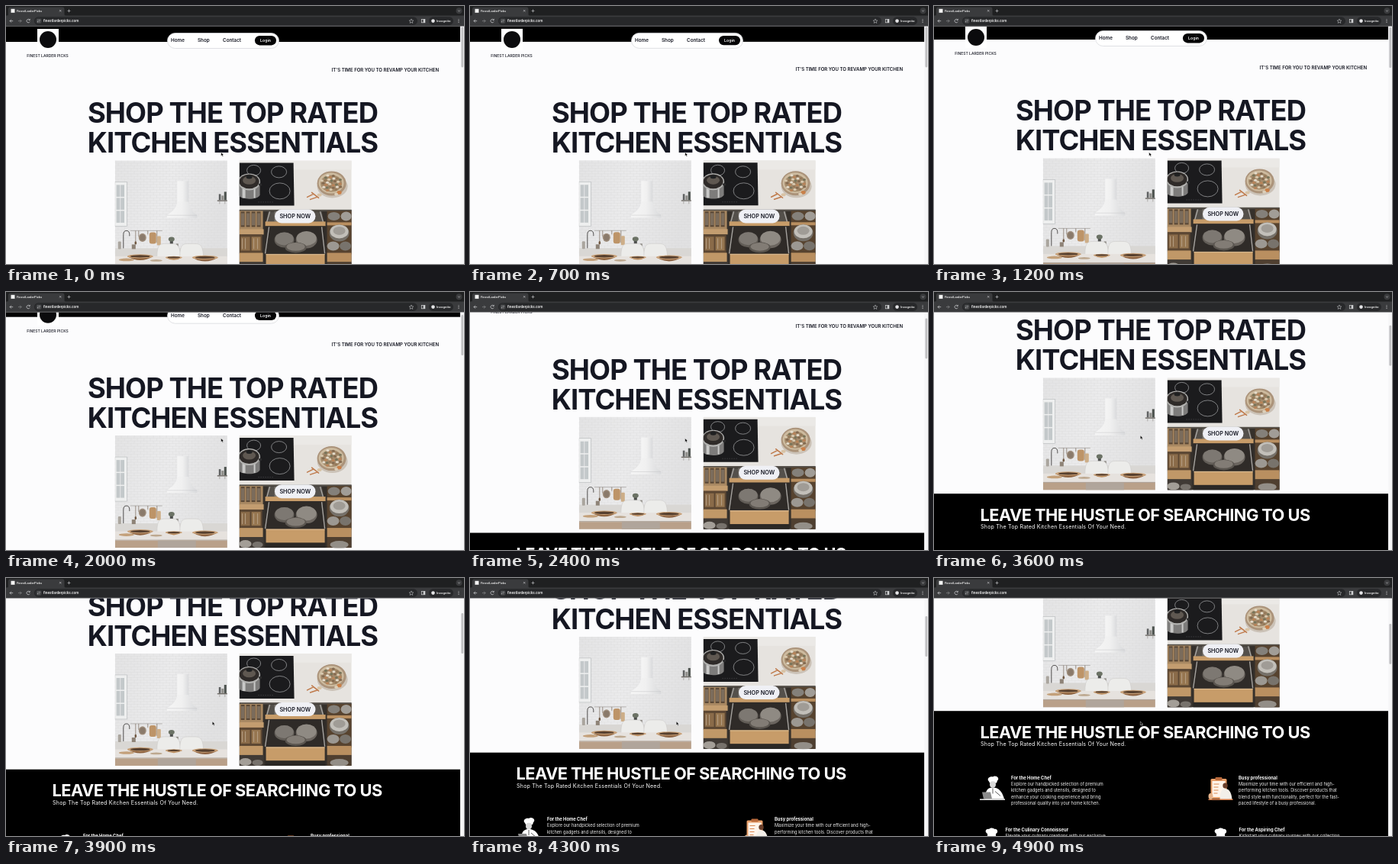
Recreate the animation shown at these times as an HTML page. Size 600x338 px, loop 5 s.

```html
<!DOCTYPE html>
<html lang="en">
<head>
<meta charset="utf-8">
<title>FinestLarderPicks</title>
<style>
  html, body { margin: 0; width: 100%; height: 100%; overflow: hidden; background: #fcfcfd; }
  svg { display: block; width: 600px; height: 338px; font-family: Inter, "Liberation Sans", sans-serif; }
  .ui { font-family: Roboto, "Liberation Sans", sans-serif; }
</style>
</head>
<body>
<svg id="stage" viewBox="0 0 600 338" xmlns="http://www.w3.org/2000/svg"></svg>
<script>
const LOOP = 5000, STEP = 100, VIEW_TOP = 26.5, PAGE_W = 595.3;
const INK = '#151722';

// time in ms, value
const SCROLL = [[0, 0], [600, 0], [1200, 3], [2000, 14.3], [2900, 67], [3000, 67.2], [3600, 90], [4300, 125.5], [4900, 180]];
const POINTER = [[3000, 281.7, 191.7], [3500, 270.3, 188]];

const rect = (x, y, w, h, fill, more = '') =>
  `<rect x="${x}" y="${y}" width="${w}" height="${h}" fill="${fill}" ${more}/>`;
const oval = (x, y, rx, ry, fill, more = '') =>
  `<ellipse cx="${x}" cy="${y}" rx="${rx}" ry="${ry}" fill="${fill}" ${more}/>`;
const path = (d, fill, more = '') => `<path d="${d}" fill="${fill}" ${more}/>`;
const line = (d, color, w = 0.6, more = '') =>
  path(d, 'none', `stroke="${color}" stroke-width="${w}" ${more}`);
// y is the middle of the capitals
const text = (x, y, str, size, weight, fill, more = '') =>
  `<text x="${x}" y="${(y + size * 0.364).toFixed(2)}" font-size="${size}" font-weight="${weight}" fill="${fill}" ${more}>${str}</text>`;
const group = (x, y, inner, more = '') => `<g transform="translate(${x} ${y})" ${more}>${inner}</g>`;

function bricks(w, h) {
  const bw = 8.4, bh = 3.5;
  let d = '';
  for (let r = 0; r * bh < h; r++) {
    const y = r * bh;
    d += `M0 ${y}H${w}`;
    for (let x = (r % 2) * bw / 2; x < w; x += bw) d += `M${x.toFixed(1)} ${y}v${bh}`;
  }
  return line(d, '#d5d5d5', 0.35);
}

function bowl(x, y, rx, color) {
  return path(`M${x - rx} ${y}Q${x} ${y + rx * 0.6} ${x + rx} ${y}Z`, color) +
    oval(x, y, rx, rx * 0.16, '#c9a27a') + oval(x, y, rx * 0.75, rx * 0.1, '#57402f');
}

function wallPhoto() {
  let s = rect(0, 0, 147, 147, 'url(#wall)') + bricks(147, 120);
  // cabinet
  s += rect(0, 28, 15.5, 58, '#eeefef', 'stroke="#b5b8ba" stroke-width=".6"');
  for (let i = 0; i < 6; i++) s += rect(1.8 + (i % 2) * 5.6, 32 + (i >> 1) * 17, 4.8, 15.5, '#c3c8ca');
  // hood
  s += rect(81.5, 27, 15, 28, 'url(#hood)') +
    path('M81.5 54C80.500 63 74 68 68 71.500V75H107.500V71.500C102 68 97.500 63 96.500 54Z', 'url(#hood)') +
    line('M68 71.800H107.500', '#c4c5c7', 0.5);
  // shelf
  s += rect(134, 52, 13, 1.4, '#6f6b66') + rect(136, 44, 2.6, 8, '#5f6162') + rect(139.5, 46, 3, 6, '#8e8d89') +
    rect(143, 41, 3, 11, '#4c524e') + line('M137 53.500V57M144 53.500V57', '#8b8681');
  // tap, hanging tools and boards
  s += line('M11 116V97Q11 92 15 92T19 97V99', '#3f3d3b', 0.9) + line('M20 92H62', '#8d8a86', 0.6) +
    line('M27 92V107M31 92V100M43 92V97M55 92V108', '#77685a', 0.7) +
    oval(36, 101, 5, 5.6, '#a1907f') + oval(36, 101, 3.6, 4.2, '#8a7a6b') + oval(27, 108, 1.3, 2.2, '#6f5741') +
    rect(45, 94, 9, 15, '#bd9468', 'rx="3"') + rect(55, 99, 5, 12, '#cdae88', 'rx="1"');
  // back counter, jars, chairs
  s += rect(0, 115, 147, 11, '#d9d7d4') + rect(4, 106, 4, 10, '#aaa59e', 'rx="1"') + rect(22, 110, 5, 6, '#8e8377') +
    rect(72, 104, 4, 12, '#4b4d4b', 'rx="1"') + oval(74, 103, 4, 3, '#6b7265') + rect(80, 109, 3, 7, '#8f8c86');
  for (const x of [55, 85])
    s += path(`M${x} 128C${x} 108 ${x + 4} 109 ${x + 15} 109S${x + 30} 108 ${x + 31} 128Z`, '#ececea',
      'stroke="#c6c5c3" stroke-width=".5"');
  // table
  s += rect(0, 125.5, 147, 11, '#e6e2de') + rect(0, 136.5, 147, 1, '#a99d91') + rect(0, 137.5, 147, 9.5, '#b9a089') +
    rect(56, 137.5, 50, 9.5, '#b0a59b');
  s += bowl(33, 125.5, 17, '#8f6440') + bowl(77, 127, 11, '#b98a5b') + bowl(118, 127, 17, '#8d6342') +
    oval(15, 130, 10, 1.8, '#c3a07a') + oval(54, 131, 8, 1.4, '#bda88f');
  return s;
}

function stovePhoto() {
  const ring = (x, y, rx, ry) => oval(x, y, rx, ry, 'none', 'stroke="#c2c3c5" stroke-width=".6"');
  let s = rect(0, 0, 147, 65, '#e6e3df') + rect(0, 0, 147, 12, '#ebe9e6');
  s += path('M0 3H71L72 59H0Z', '#1b1b1d') + ring(19, 13, 9, 7) + ring(52, 15, 10, 7.5) + ring(53, 40, 13.5, 10.5) +
    line('M25 54.500H46', '#6d6e71', 0.6, 'stroke-dasharray="1 2"');
  // pot
  s += path('M-1 29V45C1 52 25 52 27 45V29Z', '#7d7c7b') + path('M4 32V49H8V32ZM19 32V49H21V32Z', '#c9c9c8') +
    oval(13, 28, 14.5, 11, '#b3b3b1') + oval(13, 27.5, 13, 9.4, '#2f2b29') + oval(13, 26, 8.5, 5.4, '#5f5851') +
    oval(13, 21.5, 4, 2.5, '#1f2021') + rect(25.5, 30, 4, 3, '#2a2a2b', 'rx="1"');
  // basket
  s += oval(122, 34, 20, 15, '#cbc2b7') + oval(121, 30, 19, 16, '#ab937a') + oval(120.5, 29.5, 16.5, 13.5, '#cdbb9f') +
    oval(120.5, 30, 14, 11, '#a48b6c');
  const food = ['#94795a', '#d9cab0', '#77745a', '#b98358', '#e4dccd', '#846a50'];
  for (let i = 0; i < 30; i++) {
    const a = i * 2.4, r = Math.sqrt(i / 30);
    s += oval((120.5 + 14 * r * Math.cos(a)).toFixed(1), (29.5 + 11 * r * Math.sin(a)).toFixed(1), 2, 1.5, food[i % 6]);
  }
  s += line('M89 48L97 44M93 51L102 48M95 42L104 49', '#bf7a4b', 1.5, 'stroke-linecap="round"') +
    oval(105, 45, 3, 2, '#d8c3a6') + oval(131, 42, 3, 2.4, '#c97f48') + oval(127, 44, 2.4, 1.9, '#dccfb9');

  // drawers
  s += rect(0, 64.5, 147, 82.5, '#35302b') + rect(0, 64.5, 147, 2, '#55504a');
  s += rect(0, 66, 31, 25, '#a88862');
  for (let x = 2; x < 30; x += 7) s += rect(x, 67, 5, 20, '#584635') + line(`M${x + 1.5} 69V85M${x + 3.5} 69V85`, '#b3a898', 0.8);
  s += rect(0, 90, 32, 7, '#c39d70') + rect(0, 97, 30, 25, '#5c4733') + rect(2, 100, 12, 18, '#8a6b49') +
    rect(16, 100, 12, 18, '#967650') + line('M4 102V116M8 102V116M19 102V116M24 102V116', '#bba78d', 0.9) +
    rect(0, 121, 31, 12, '#c09868') + rect(0, 133, 32, 14, '#403a35') + oval(8, 142, 8, 5, '#a39e97') + oval(24, 143, 7, 4, '#77726c');
  s += path('M38 67H108L111 81H35Z', '#54504b') + rect(46, 67, 18, 13, '#7d7872') + rect(68, 68, 28, 11, '#403c38') +
    line('M40 67L36 81M106 67L110 81', '#aaa7a3', 1.4) + rect(34, 80, 79, 6, '#c79c69') + rect(34, 86, 79, 37, '#2f2b28') +
    path('M39 87L34 122M108 87L112 122', 'none', 'stroke="#a5a29e" stroke-width="1.4"') +
    oval(59, 104, 13, 10, '#625d57') + oval(59, 102.5, 12, 8.5, '#7d7872') + oval(88, 104, 14, 11, '#6b655f') +
    oval(88, 102, 13, 9.5, '#8f8a83') + oval(74, 114, 14, 7, '#5a554f') + oval(74, 113, 12, 5.4, '#827c75') +
    rect(35, 122.5, 77, 18, '#c79c69') + rect(35, 122.5, 77, 1.2, '#dab98e') + rect(34, 140.5, 79, 6.5, '#2b2825');
  s += rect(115, 66, 32, 57, '#57432f') + oval(124, 73, 8, 5.5, '#84807a') + oval(140, 73, 7, 6, '#a19d97') +
    rect(115, 81, 32, 4, '#b98f60') + oval(131, 95, 13, 11, '#757069') + oval(131, 93, 12, 9, '#c2bfb9') +
    oval(131, 92, 8, 5.5, '#a09c96') + oval(123, 112, 8, 6, '#9c9892') + oval(139, 112, 7.5, 6, '#78736c') +
    rect(115, 121, 32, 12, '#b98f60') + rect(115, 133, 32, 14, '#4f3f30') + oval(131, 143, 12, 5, '#938e87');
  return s;
}

const chefIcon =
  path('M12 6C8 2 14 -1 17 0C21 -3 27 2 23 5L22 8H13Z', '#fff') + oval(17, 10, 4, 4.2, '#d9d9d9') +
  path('M7 29C7 18 10 14 17 14S29 18 32 29Z', '#fff') + path('M3 20H14L16 29H5Z', '#8b8b8b') +
  rect(0, 29, 33, 1.4, '#fff') + line('M17 15V22M20 19L27 25', '#333', 0.8);

const clipIcon =
  rect(3, 2, 21, 26, '#e9a06a', 'rx="1.5"') + rect(5, 5, 17, 21, '#fff4ea') + rect(9, 0, 9, 4, '#b96a3c', 'rx="1"') +
  line('M7 9H14M7 13H13M7 17H13M7 21H12', '#d98a55', 1) + oval(22, 11, 3.2, 3.6, '#6a3f2a') +
  path('M15 29C15 18 18 15 22 15S30 18 31 29Z', '#f3efe9') + rect(0, 28.5, 32, 1.5, '#d97f4b') + oval(3, 25, 3, 4, '#e6b48b');

const hatIcon = path('M3 10V6C-2 3 2 -1 5 0C8 -3 12 -1 12 0C16 -1 18 4 14 6V10Z', '#fff') +
  rect(4, 11, 9, 9, '#d9d9d9');

function feature(x, y, title, rows) {
  return text(x, y, title, 5.8, 700, '#fff') +
    rows.map((r, i) => text(x, y + 8.3 + i * 8.5, r, 5.65, 400, '#f1f1f1')).join('');
}

function page() {
  const middle = 'text-anchor="middle"', tight = 'letter-spacing="-.025em"';
  let s = rect(0, 0, PAGE_W, 620, '#fcfcfd') + rect(0, 20, PAGE_W, 27, '#000');
  s += rect(41, 30, 28, 28, '#fff') + oval(55, 44, 11, 11, '#0b0b0d') +
    text(54.5, 65, 'FINEST LARDER PICKS', 5, 500, INK, middle);
  s += rect(211.5, 35.5, 146, 20, '#fff', 'rx="10" stroke="#d9dade" stroke-width=".8"') +
    text(216, 45, 'Home', 6.3, 600, INK) + text(251, 45, 'Shop', 6.3, 600, INK) + text(284, 45, 'Contact', 6.3, 600, INK) +
    rect(326, 39, 28, 12.4, '#050506', 'rx="6.2"') + text(340, 45, 'Login', 5.2, 600, '#fff', middle);
  s += text(567, 83.3, "IT'S TIME FOR YOU TO REVAMP YOUR KITCHEN", 6.05, 600, INK, 'text-anchor="end"');
  s += text(297, 140.2, 'SHOP THE TOP RATED', 36.3, 700, INK, middle + tight.padStart(30)) +
    text(297, 179.2, 'KITCHEN ESSENTIALS', 36.3, 700, INK, middle + tight.padStart(30));
  s += group(142.8, 202.4, wallPhoto(), 'clip-path="url(#photo)"') + group(305.6, 202.4, stovePhoto(), 'clip-path="url(#photo)"');
  s += rect(352, 266.5, 53.5, 18, '#eff0f5', 'rx="9"') +
    text(378.8, 275.5, 'SHOP NOW', 7.3, 600, INK, middle);
  s += rect(0, 354.2, PAGE_W, 260, '#000') +
    text(60.5, 381.7, 'LEAVE THE HUSTLE OF SEARCHING TO US', 21.8, 700, '#fff', tight) +
    text(61, 397.8, 'Shop The Top Rated Kitchen Essentials Of Your Need.', 7.14, 400, '#fff', 'letter-spacing=".18"');
  s += group(60, 440.5, chefIcon) + group(359.5, 441, clipIcon) + group(67, 509, hatIcon) + group(367, 509, hatIcon);
  s += feature(101, 441.6, 'For the Home Chef', ['Explore our handpicked selection of premium',
    'kitchen gadgets and utensils, designed to', 'enhance your cooking experience and bring', 'professional quality into your home kitchen.']);
  s += feature(399, 441.6, 'Busy professional', ['Maximize your time with our efficient and high-',
    'performing kitchen tools. Discover products that', 'blend style with functionality, perfect for the fast-', 'paced lifestyle of a busy professional.']);
  s += feature(93.5, 509.6, 'For the Culinary Connoisseur', ['Elevate your culinary creations with our exclusive']);
  s += feature(399.5, 509.6, 'For the Aspiring Chef', ['Kickstart your culinary journey with our collection']);
  return s;
}

function browser() {
  const c = '#d5d6d8', dim = '#8b8c8f';
  let s = rect(0, 0, 600, 13, '#1f2021') + rect(0, 12.5, 600, VIEW_TOP - 12.5, '#3a3b3d') +
    path('M1 13Q3 13 3 11V4Q3 1.500 5.500 1.500H74Q76.500 1.500 76.500 4V11Q76.500 13 78.500 13Z', '#3a3b3d');
  s += rect(6.5, 3.8, 5, 5, '#f4f4f4') + text(14, 6.3, 'FinestLarderPicks', 4.1, 500, '#f0f0f0') +
    line('M70 5.100L72.400 7.500M72.400 5.100L70 7.500', c, 0.6) + line('M82.500 4.400V8.400M80.500 6.400H84.500', c, 0.6) +
    oval(593.5, 6.2, 4, 4, '#3a3b3d') + line('M592 5.600L593.500 7L595 5.600', c, 0.6);
  s += line('M9.200 19.600H5M7 17.600L5 19.600L7 21.600', c, 0.7) + line('M16 19.600H20.200M18.200 17.600L20.200 19.600L18.200 21.600', dim, 0.7) +
    line('M31 18.300A2.200 2.200 0 1 0 31.200 20.500M31.300 16.800V18.500H29.600', c, 0.7);
  s += rect(37, 14.3, 502, 10.6, '#27282a', 'rx="5.3"') + oval(43, 19.6, 4, 4, '#3a3b3d') +
    line('M41 18.500H43.800M42.200 20.700H45', c, 0.5) + oval(44.5, 18.5, 0.6, 0.6, c) + oval(41.5, 20.7, 0.6, 0.6, c) +
    text(49, 19.7, 'finestlarderpicks.com', 4.75, 500, '#f0f0f0');
  s += path('M531 16.900L531.800 18.900L533.800 19L532.300 20.400L532.800 22.400L531 21.300L529.200 22.400L529.700 20.400L528.200 19L530.200 18.900Z',
    'none', `stroke="${c}" stroke-width=".5"`);
  s += rect(544.3, 17.4, 4.6, 4.4, 'none', `stroke="${c}" stroke-width=".7"`) + rect(546.7, 17.4, 2.2, 4.4, c);
  s += rect(554, 14.3, 32, 10.6, '#27282a', 'rx="5.3"') + oval(559.5, 19.6, 2.3, 2.3, '#e4e4e6') +
    text(564, 19.7, 'Incognito', 4.4, 500, '#f0f0f0');
  for (const y of [17.7, 19.6, 21.5]) s += oval(593, y, 0.55, 0.55, c);
  return `<g class="ui">${s}</g>`;
}

const stops = (...cs) => cs.map((c, i) => `<stop offset="${i / (cs.length - 1)}" stop-color="${c}"/>`).join('');
const stage = document.getElementById('stage');
stage.innerHTML = `<defs>
  <clipPath id="photo"><rect width="147.300" height="147.300"/></clipPath>
  <clipPath id="view"><rect y="${VIEW_TOP}" width="${PAGE_W}" height="312"/></clipPath>
  <linearGradient id="wall" x2="1" y2=".3">${stops('#e3e3e4', '#ebebec', '#e1e1e2')}</linearGradient>
  <linearGradient id="hood">${stops('#f5f5f5', '#f0f0f0', '#d9dadc')}</linearGradient>
</defs>
<g clip-path="url(#view)"><g id="page">${page()}</g></g>
${rect(PAGE_W, VIEW_TOP, 600 - PAGE_W, 312, '#f6f6f7')}${rect(596.4, 27.5, 2.8, 53, '#bfbfc1', 'rx="1.4" id="thumb"')}
${browser()}
${path('M0 0V4.800L1.200 3.800L2 5.500L2.900 5.100L2.100 3.400H3.500Z', '#000', 'id="pointer" stroke="#fff" stroke-width=".4"')}`;

const [pageEl, thumb, pointer] = ['page', 'thumb', 'pointer'].map(id => document.getElementById(id));

// monotone cubic through the scroll points
const slopes = SCROLL.slice(1).map((p, i) => (p[1] - SCROLL[i][1]) / (p[0] - SCROLL[i][0]));
const tangents = SCROLL.map((_, i) => {
  const a = slopes[i - 1], b = slopes[i];
  if (a === undefined) return b;
  if (b === undefined) return a;
  return a * b > 0 ? 2 * a * b / (a + b) : 0;
});

function scrollAt(t) {
  let i = 0;
  while (i < SCROLL.length - 2 && t >= SCROLL[i + 1][0]) i++;
  const [t0, y0] = SCROLL[i], [t1, y1] = SCROLL[i + 1];
  const h = t1 - t0, u = Math.min(1, (t - t0) / h), v = 1 - u;
  return y0 * (1 + 2 * u) * v * v + y1 * u * u * (3 - 2 * u) + h * u * v * (tangents[i] * v - tangents[i + 1] * u);
}

function pointerAt(t) {
  const [[t0, x0, y0], [t1, x1, y1]] = POINTER;
  const u = Math.max(0, Math.min(1, (t - t0) / (t1 - t0)));
  return [x0 + (x1 - x0) * u, y0 + (y1 - y0) * u];
}

function draw(now) {
  const t = Math.floor((now % LOOP) / STEP) * STEP;
  const y = scrollAt(t);
  pageEl.setAttribute('transform', `translate(0 ${(-y).toFixed(2)})`);
  thumb.setAttribute('transform', `translate(0 ${(y * 0.18).toFixed(2)})`);
  pointer.setAttribute('transform', `translate(${pointerAt(t).join(' ')})`);
}

const start = performance.now();
function tick() {
  draw(performance.now() - start);
  requestAnimationFrame(tick);
}
tick();
</script>
</body>
</html>
```
